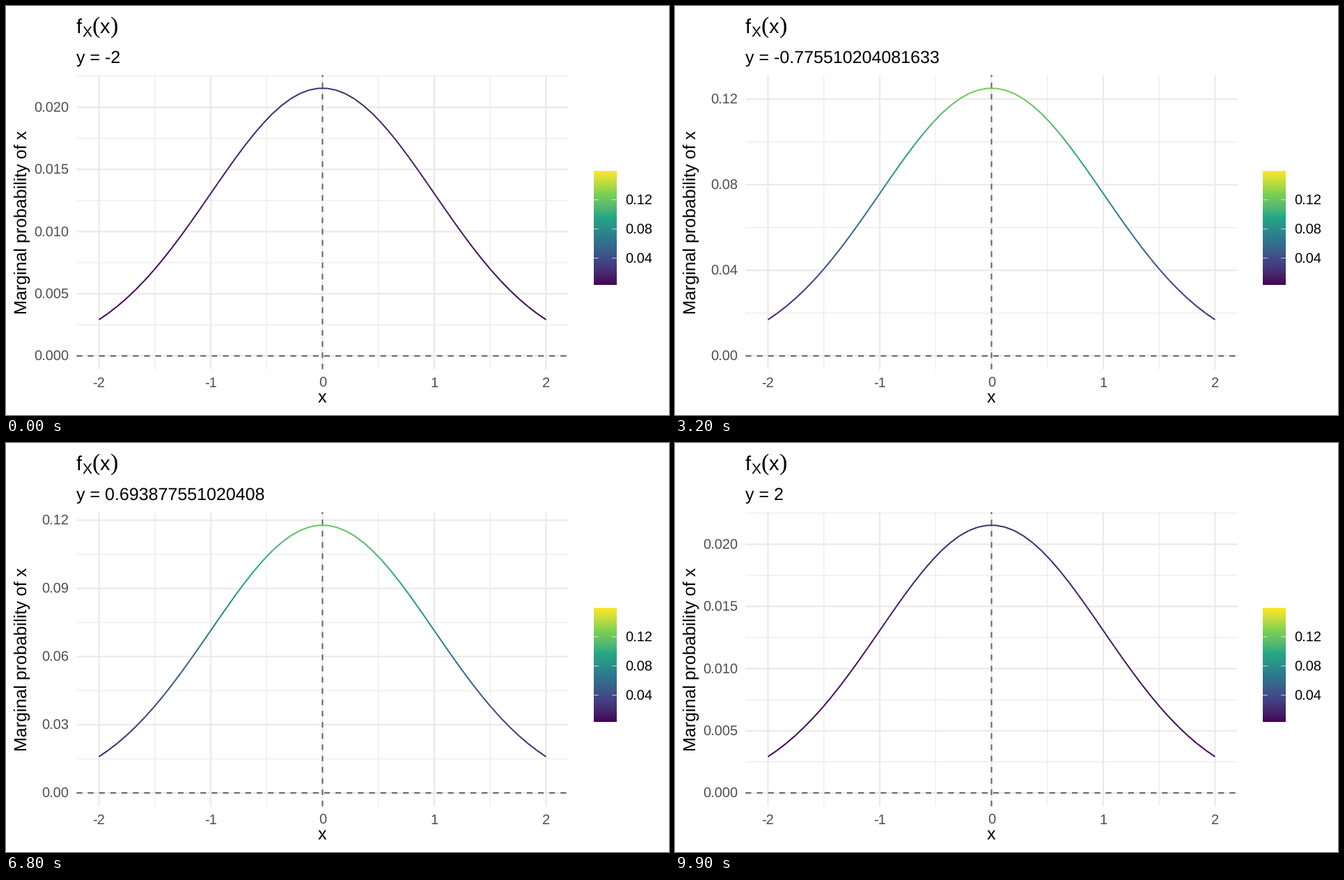
A matplotlib script for the animation above (10000 ms loop, 952x588 px).

```python
import itertools
import math

import matplotlib
import matplotlib.pyplot as plt
import numpy as np
from matplotlib.animation import FuncAnimation
from matplotlib.collections import LineCollection
from matplotlib.colors import to_rgb

W, H, DPI = 952, 588, 100
PT = 72 / DPI                       # points per pixel
LEFT, RIGHT, TOP, BOTTOM = 101.4, 807.5, 99.2, 522.3
BASE = 24.56                        # base text size in pixels
SMALL = 0.8 * BASE
GRID, TICK_TEXT, DASH = "#EBEBEB", "#4D4D4D", "#666666"
MAJOR, MINOR, CURVE = 2.38, 1.19, 2.02
STATES = 50
STEP = 4 / (STATES - 1)

matplotlib.rcParams.update({
    "font.family": "Liberation Sans",
    "text.hinting": "none",
    "text.hinting_factor": 1,
})

grid_x = np.array([-2 + i * STEP for i in range(STATES - 1)] + [2.0])


def density(x, y):
    return np.exp(-(x * x + y * y) / 2) / (2 * math.pi)


# Colour scale: viridis stops blended in Lab space
TO_XYZ = np.array([[0.4124564, 0.3575761, 0.1804375],
                   [0.2126729, 0.7151522, 0.0721750],
                   [0.0193339, 0.1191920, 0.9503041]])
WHITE = TO_XYZ.sum(axis=1)
TO_LAB = np.array([[0, 116, 0], [500, -500, 0], [0, 200, -200]])


def rgb_to_lab(rgb):
    lin = np.where(rgb > 0.04045, ((rgb + 0.055) / 1.055) ** 2.4, rgb / 12.92)
    t = lin @ TO_XYZ.T / WHITE
    f = np.where(t > 0.008856, np.cbrt(t), 7.787 * t + 16 / 116)
    return f @ TO_LAB.T - [16, 0, 0]


def lab_to_rgb(lab):
    fy = (lab[:, 0] + 16) / 116
    f = np.stack([fy + lab[:, 1] / 500, fy, fy - lab[:, 2] / 200], axis=1)
    t = np.where(f > 0.206893, f ** 3, (f - 16 / 116) / 7.787)
    lin = np.clip((t * WHITE) @ np.linalg.inv(TO_XYZ).T, 0, 1)
    rgb = np.where(lin > 0.0031308, 1.055 * lin ** (1 / 2.4) - 0.055, 12.92 * lin)
    return np.clip(rgb, 0, 1)


HUES = ["#440154", "#414487", "#2A788E", "#22A884", "#7AD151", "#FDE725"]
stops = rgb_to_lab(np.array([to_rgb(c) for c in HUES]))
Z_MIN = density(2, 2)
Z_MAX = density(STEP / 2, STEP / 2)


def shade(z):
    t = (np.asarray(z) - Z_MIN) / (Z_MAX - Z_MIN)
    at = np.linspace(0, 1, len(stops))
    return lab_to_rgb(np.stack([np.interp(t, at, s) for s in stops.T], axis=1))


def nice_breaks(lo, hi, m=5):
    """Extended Wilkinson axis breaks that fall inside lo..hi."""
    steps = [1, 5, 2, 2.5, 4, 3]
    span = hi - lo
    best, found = -2, (lo, hi, span)

    def score(s, c, d):
        return 0.25 * s + 0.2 * c + 0.5 * d + 0.05

    def search():
        nonlocal best, found
        for j in itertools.count(1):
            for i, q in enumerate(steps):
                simple = 1 - i / (len(steps) - 1) - j
                if score(simple + 1, 1, 1) < best:
                    return
                for k in itertools.count(2):
                    dense = 2 - (k - 1) / (m - 1) if k >= m else 1
                    if score(simple + 1, 1, dense) < best:
                        break
                    first = math.ceil(math.log10(span / (k + 1) / j / q))
                    for z in itertools.count(first):
                        step = j * q * 10.0 ** z
                        extra = max(step * (k - 1) - span, 0) / 2
                        cover = 1 - (extra / (0.1 * span)) ** 2
                        if score(simple + 1, cover, dense) < best:
                            break
                        start = math.floor(hi / step) * j - (k - 1) * j
                        stop = math.ceil(lo / step) * j
                        for n in range(start, stop + 1):
                            a = n * step / j
                            b = a + step * (k - 1)
                            zero = n % j == 0 and a <= 0 <= b
                            c = 1 - 0.5 * ((hi - b) ** 2 + (lo - a) ** 2) / (0.1 * span) ** 2
                            r = (k - 1) / (b - a)
                            rt = (m - 1) / (max(b, hi) - min(a, lo))
                            got = score(simple + zero, c, 2 - max(r / rt, rt / r))
                            if got > best:
                                best, found = got, (a, b, step)

    search()
    a, b, step = found
    marks = [a + i * step for i in range(round((b - a) / step) + 1)]
    return [v for v in marks if lo <= v <= hi]


def midpoints(marks, lo, hi):
    step = marks[1] - marks[0]
    mids = [marks[0] + (i - 0.5) * step for i in range(len(marks) + 1)]
    return [v for v in mids if lo <= v <= hi]


def decimals(marks):
    return next(d for d in range(1, 8)
                if all(abs(round(v, d) - v) < 1e-9 for v in marks))


def px(x):
    return LEFT + (np.asarray(x) + 2.2) / 4.4 * (RIGHT - LEFT)


def py(v, peak):
    return BOTTOM - (np.asarray(v) / peak + 0.05) / 1.1 * (BOTTOM - TOP)


fig = plt.figure(figsize=(W / DPI, H / DPI), dpi=DPI, facecolor="white")
ax = fig.add_axes([0, 0, 1, 1])
ax.axis("off")


def label(x, y, text, size, color="black", **kw):
    kw.setdefault("va", "baseline")
    return ax.text(x, y, text, fontsize=size * PT, color=color, **kw)


def lines(segments, width, color=GRID, z=1, **kw):
    coll = LineCollection(segments, linewidths=width * PT, colors=color,
                          zorder=z, snap=False, **kw)
    ax.add_collection(coll, autolim=False)
    return coll


def rows(ys):
    return [[(LEFT, y), (RIGHT, y)] for y in ys]


def columns(xs):
    return [[(x, TOP), (x, BOTTOM)] for x in xs]


# Fixed grid, reference lines and axis text
lines(columns(px([-1.5, -0.5, 0.5, 1.5])), MINOR)
lines(columns(px([-2, -1, 0, 1, 2])), MAJOR, z=2)
zero_y = float(py(0, 1))
for xs, ys in [((LEFT, RIGHT), (zero_y, zero_y)),
               ((px(0), px(0)), (BOTTOM, TOP))]:
    ax.plot(xs, ys, color=DASH, lw=CURVE * PT, ls=(0, (4, 4)),
            dash_capstyle="butt", snap=False, zorder=3)
for x in range(-2, 3):
    label(px(x), 548, str(x), SMALL, TICK_TEXT, ha="center")
label((LEFT + RIGHT) / 2, 570.5, "x", BASE, ha="center")
label(30, (TOP + BOTTOM) / 2, "Marginal probability of x", BASE,
      rotation=90, ha="right", rotation_mode="default").set(
          rotation_mode="anchor", ha="center")

# Title
TITLE = 1.2 * BASE
label(101, 39, "f", TITLE)
label(109.3, 43.8, "X", 0.7 * TITLE)
label(123.3, 39, "(", 34, family="Liberation Serif")
label(134.8, 39, "x", TITLE)
label(149.6, 39, ")", 34, family="Liberation Serif")
subtitle = label(101, 82, "", BASE)

# Colour bar
BAR = (844.3, 876.9, 401.2, 238.0)
ramp = shade(np.linspace(Z_MAX, Z_MIN, 300))
ax.imshow(ramp[:, None, :], extent=BAR, aspect="auto",
          interpolation="bilinear", zorder=2)
for v in (0.04, 0.08, 0.12):
    y = BAR[2] - (v - Z_MIN) / (Z_MAX - Z_MIN) * (BAR[2] - BAR[3])
    tick = 0.2 * (BAR[1] - BAR[0])
    lines([[(BAR[0], y), (BAR[0] + tick, y)],
           [(BAR[1] - tick, y), (BAR[1], y)]], 0.72, "white", z=4)
    label(889.3, y + 7, f"{v:.2f}", SMALL)

# Moving parts
minor_rows = lines([], MINOR)
major_rows = lines([], MAJOR, z=2)
curve = lines([], CURVE, z=4)
y_labels = [label(90.4, 0, "", SMALL, TICK_TEXT, ha="right") for _ in range(10)]

ax.set_xlim(0, W)
ax.set_ylim(H, 0)


def update(frame):
    # The curve steps on even frames, its caption one frame later
    state = frame // 2
    named = max(0, (frame - 1) // 2)
    subtitle.set_text(f"y = {grid_x[named]:.15g}")

    z = density(grid_x, grid_x[state])
    peak = z.max()
    points = np.column_stack([px(grid_x), py(z, peak)])
    curve.set_segments(np.stack([points[:-1], points[1:]], axis=1))
    curve.set_color(shade(z[:-1]))

    lo, hi = -0.05 * peak, 1.05 * peak
    marks = nice_breaks(lo, hi)
    major_rows.set_segments(rows(py(marks, peak)))
    minor_rows.set_segments(rows(py(midpoints(marks, lo, hi), peak)))
    places = decimals(marks)
    for text, v in itertools.zip_longest(y_labels, marks):
        text.set_text("" if v is None else f"{v:.{places}f}")
        if v is not None:
            text.set_y(float(py(v, peak)) + 7)
    return []


anim = FuncAnimation(fig, update, frames=100, interval=100,
                     repeat=True, repeat_delay=0, blit=False)
plt.show()
```
